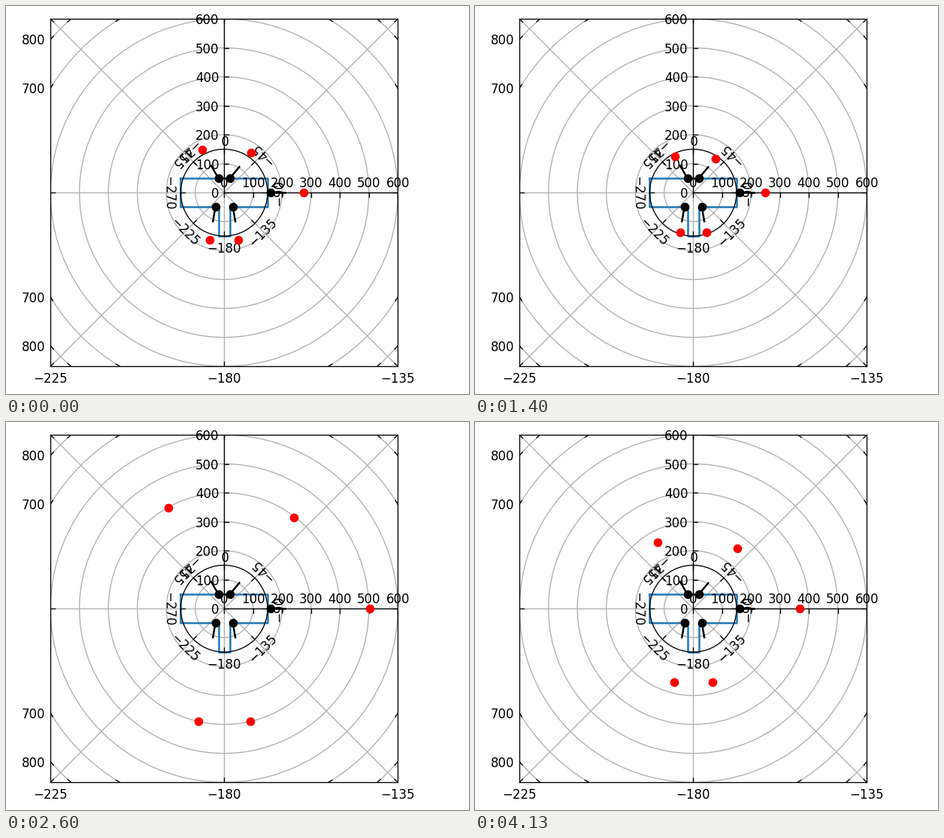
A matplotlib script for the animation above (4.2 s loop, 616 by 516 pixels).

```python
import numpy as np
import matplotlib.pyplot as plt
from matplotlib.animation import FuncAnimation

W, H, DPI = 616, 516, 120
LEFT, TOP, SIDE = 59.2, 17.2, 462
LIM = 600
UNIT = 2 * LIM / SIDE          # data units per pixel
TICK = 3.5 * DPI / 72 * UNIT
RING = 150

FRAMES = 63
HOLDS = (24, 27, 30, 33, 36, 41)   # updates that arrive late
SKIPS = (25, 42, 58)               # updates that catch up

# x, y, heading in degrees counter-clockwise from straight up
SENSORS = np.array([(-20, 50, 30), (20, 50, -40), (160, 0, -90),
                    (30, -50, -170), (-30, -50, 170)], float)
ORIGINS = SENSORS[:, :2]


def heading(deg):
    a = np.radians(deg)
    return np.stack([-np.sin(a), np.cos(a)], axis=-1)


AIMS = heading(SENSORS[:, 2])

plt.rcParams.update({"font.family": "DejaVu Sans", "font.size": 10})
fig = plt.figure(figsize=(W / DPI, H / DPI), dpi=DPI, facecolor="white")
ax = fig.add_axes([LEFT / W, 1 - (TOP + SIDE) / H, SIDE / W, SIDE / H])
ax.set(xlim=(-LIM, LIM), ylim=(-LIM, LIM), xticks=[], yticks=[])


def line(points, color="black", lw=0.8, z=2.5, clip=True):
    x, y = np.asarray(points, float).T
    ax.plot(x, y, color=color, lw=lw, zorder=z, clip_on=clip)


def circle(r, color, z):
    line(r * heading(np.linspace(0, 360, 181)), color, z=z)


def tick(x, y, dx, dy):
    line([(x, y), (x + dx * TICK, y + dy * TICK)])


def label(x, y, value, ha="center", angle=0):
    text = str(value).replace("-", "\u2212")
    ax.text(x, y, text, ha=ha, va="center_baseline", rotation=angle,
            rotation_mode="anchor", zorder=2.6)


def draw_grid():
    for r in range(100, 801, 100):
        circle(r, "#b0b0b0", 1)
    for deg in range(0, 360, 45):
        line([(0, 0), 900 * heading(deg)], "#b0b0b0", z=1)


def draw_frame_ticks():
    s = np.sqrt(0.5)
    for sx in (-1, 1):
        tick(sx * LIM, 0, -sx, 0)
        tick(0, sx * LIM, 0, -sx)
        for sy in (-1, 1):
            tick(sx * LIM, sy * LIM, -sx * s, -sy * s)
            for r in (700, 800):
                q = np.sqrt(r * r - LIM * LIM)
                tick(sx * LIM, sy * q, -sx * q / r, sy * LIM / r)
                tick(sx * q, sy * LIM, sx * LIM / r, -sy * q / r)
    for r in (700, 800):
        q = np.sqrt(r * r - LIM * LIM)
        for y in (-q, q):
            label(-LIM - 6.9 * UNIT, y, r, "right")
    for x, deg in ((-LIM, -225), (0, -180), (LIM, -135)):
        label(x, -LIM - 15.2 * UNIT, deg)


def draw_axes():
    line([(0, 0), (0, LIM)])
    line([(0, 0), (LIM, 0)])
    for r in range(0, 601, 100):
        tick(0, r, 1, 0)
        tick(r, 0, 0, -1)
        label(-6.9 * UNIT, r, r, "right")
        label(r, 13.8 * UNIT, r)
    circle(RING, "black", 2.5)
    for deg in range(-315, 46, 45):
        out = heading(deg)
        tick(*(RING * out), *-out)
        x, y = 71.5 * UNIT * out + np.array([-0.7, -0.8]) * UNIT
        label(x, y, deg, angle=deg + 180)


def draw_robot():
    body = [(-150, 50), (150, 50), (150, -50), (20, -50), (20, -150),
            (-20, -150), (-20, -50), (-150, -50), (-150, 50)]
    line(body, "#1f77b4", 1.5, 2)
    for start, aim in zip(ORIGINS, AIMS):
        line([start, start + 50 * aim], lw=1.5, z=2)
    ax.plot(*ORIGINS.T, "o", color="black", ms=6, zorder=2)


draw_grid()
draw_frame_ticks()
draw_axes()
draw_robot()
echoes, = ax.plot([], [], "o", color="red", ms=6, zorder=3)


def update(k):
    step = k - sum(k >= h for h in HOLDS) + sum(k >= s for s in SKIPS)
    distance = 200 + 200 * np.sin(3.588 + 0.1 * step)
    echoes.set_data(*(ORIGINS + distance * AIMS).T)
    return echoes,


anim = FuncAnimation(fig, update, frames=FRAMES, interval=4200 / FRAMES,
                     repeat=True)
plt.show()
```
